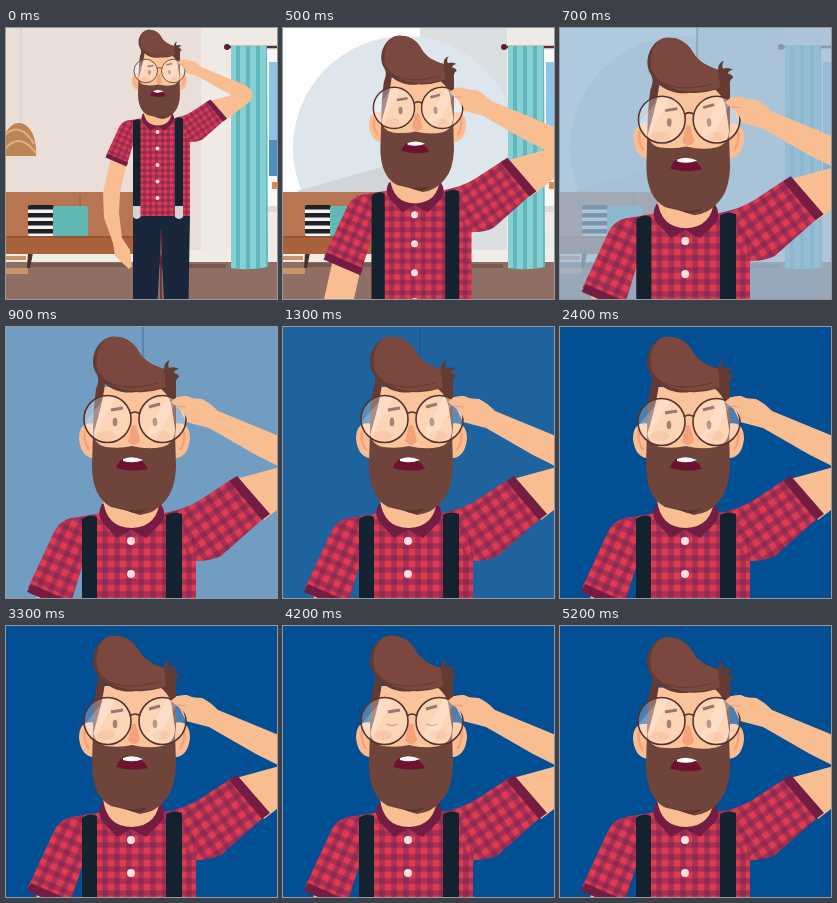
Animation, 271 px wide and 271 px high, one loop 5.3 s. Source, as an HTML page:

```html
<!DOCTYPE html>
<html lang="en">
<head>
<meta charset="utf-8">
<title>Puzzled man</title>
<style>
html, body { margin: 0; width: 100%; height: 100%; overflow: hidden; background: #034f93; }
svg { display: block; width: 100%; height: 100%; }
</style>
</head>
<body>
<svg viewBox="0 0 271 271">
  <defs>
    <pattern id="plaid" width="12" height="12" patternUnits="userSpaceOnUse">
      <rect width="12" height="12" fill="#de3a50"/>
      <path d="M0 3H12" stroke="#5c1f52" stroke-width="5.5" opacity=".4"/>
      <path d="M3 0V12" stroke="#5c1f52" stroke-width="5.5" opacity=".4"/>
    </pattern>
    <pattern id="plaidArm" href="#plaid" patternTransform="translate(190 180) rotate(-34)"/>
    <pattern id="plaidLeft" href="#plaid" patternTransform="translate(58 196) rotate(24)"/>
    <pattern id="folds" width="10" height="10" patternUnits="userSpaceOnUse">
      <rect width="10" height="10" fill="#84d0d2"/>
      <rect width="4" height="10" fill="#62b6bc"/>
    </pattern>
    <pattern id="stripes" width="8" height="8" y="177" patternUnits="userSpaceOnUse">
      <rect width="8" height="8" fill="#f4f1ee"/>
      <rect width="8" height="4.5" fill="#1e2027"/>
    </pattern>
    <clipPath id="lenses"><circle cx="101.5" cy="92" r="23.5"/><circle cx="156.5" cy="92" r="23.5"/></clipPath>
  </defs>

  <g id="room">
    <rect width="271" height="271" fill="#e9dfd8"/>
    <rect x="195" width="76" height="271" fill="#f0eae6"/>
    <path d="M15 0V94" stroke="#d5cbc4"/>
    <path d="M-4 128C-6 84 32 84 30 128Z" fill="#bd8455"/>
    <path d="M-2 108Q14 92 28 116M0 120Q14 104 30 125" fill="none" stroke="#deb083" stroke-width="2"/>
    <g id="wash" opacity="0">
      <path d="M0 0H137V222H0Z" fill="#fdfdfe"/>
      <path d="M137 0H224V222H137Z" fill="#dcdfe2"/>
      <circle cx="122" cy="120" r="112" fill="#dce6ec"/>
      <path d="M14 163L137 128V222H50Z" fill="#cfd5d8"/>
    </g>
    <rect y="222" width="271" height="13" fill="#f2ece8"/>
    <rect y="234" width="271" height="37" fill="#8f6f63"/>
    <path d="M22 237H122M150 238H220" stroke="#78594f" stroke-width="4"/>
    <path d="M0 240H22V246H0ZM0 228H20V232H0Z" fill="#c99468"/>
    <path d="M22 225H27L24 240H21ZM148 225H154L161 243H157Z" fill="#49302c"/>
    <rect x="-6" y="164" width="155" height="50" rx="4" fill="#b77551"/>
    <path d="M74 166V208" stroke="#955a3d"/>
    <rect x="-6" y="208" width="160" height="18" rx="4" fill="#a8623e"/>
    <path d="M0 209H150" stroke="#8b5036" stroke-width="1.5"/>
    <rect x="22" y="177" width="26" height="31" rx="2" fill="url(#stripes)"/>
    <rect x="47" y="178" width="35" height="30" rx="2" fill="#61b9b5"/>
    <rect x="260" y="22" width="11" height="162" fill="#faf8f6"/>
    <rect x="263" y="34" width="8" height="114" fill="#8fc4e4"/>
    <rect x="263" y="112" width="8" height="36" fill="#4e8fc0"/>
    <path d="M266 154H271V161H266Z" fill="#dd8748"/>
    <path d="M258 178H271V184H258Z" fill="#e2d9d3"/>
    <path d="M221 19H271" stroke="#5a3038" stroke-width="2.5"/>
    <circle cx="221" cy="19" r="3" fill="#5a2030"/>
    <path d="M225 18H261L262 239Q243 243 225 240Z" fill="url(#folds)"/>
  </g>

  <g id="blank" opacity="0">
    <rect width="271" height="271" fill="#fff"/>
    <path d="M137 0V60" stroke="#c3c9cf" stroke-width="2"/>
  </g>
  <rect id="blue" width="271" height="271" fill="#034f93" opacity="0"/>

  <g id="man">
    <path d="M76 376H190L187 556H138L132 420L125 556H76Z" fill="#1a273a"/>
    <path d="M132 410V556" stroke="#5d2638" stroke-width="3"/>
    <path d="M32 264L16 336L18 386L36 436L40 462L68 488L74 482L70 450L54 426L48 376L50 336L63 278Z" fill="#f9bd92"/>
    <path d="M168 70L196 72Q203 75 212 84L300 120Q324 134 310 153L258 193L230 152L274 140L250 128L203 101L180 95Z" fill="#f9bd92"/>
    <path d="M96 186L66 191Q54 193 48 205L60 274L76 236V382H190V234L210 230L150 180Z" fill="url(#plaid)"/>
    <path d="M76 190L66 191Q54 193 47 207L22 261L64 279L76 240Z" fill="url(#plaidLeft)"/>
    <path d="M158 186Q180 182 194 173L226 152L259 190L215 229Q205 234 190 234L176 215Z" fill="url(#plaidArm)"/>
    <path d="M25 257L66 275L63 283L21 265ZM223 154L231 149L264 187L256 193Z" fill="#741d43"/>
    <path d="M190 234L186 208" stroke="#7b1f49" opacity=".55"/>
    <path d="M76 192Q83 186 91 190V372H76ZM160 188Q168 184 176 187V372H160Z" fill="#14212e"/>
    <path d="M76 362H91V384Q83 392 76 384ZM160 362H176V384Q168 392 160 384Z" fill="#d4d4d6"/>
    <path d="M96 177Q90 187 97 196L111 211L125 203L140 211L156 195Q161 187 155 177Z" fill="#741d43"/>
    <path d="M97 172Q100 201 126 201Q152 200 154 172Z" fill="#f9bd92"/>
    <g id="buttons" fill="#f5dfe1"></g>

    <g id="head">
      <path d="M90 97Q73 93 73 112Q75 129 86 131H92ZM167 97Q184 93 184 112Q182 129 171 131H166Z" fill="#fabd92"/>
      <path d="M79 104Q77 114 83 123M178 104Q180 114 174 123" fill="none" stroke="#f3a37b" stroke-width="2.5"/>
      <path d="M92 60H168V135H88Z" fill="#fac39a"/>
      <path d="M87 104Q88 118 100 120Q114 122 126 119Q142 123 156 120Q168 117 169 104L170 140Q169 163 159 174Q150 186 134 188Q120 183 105 180Q86 170 86 138Z" fill="#6e443b"/>
      <path d="M104 177Q122 187 142 181Q134 190 122 184Z" fill="#5c3630"/>
      <path d="M87 108C87 92 88 76 90 62C93 55 93 51 90 46C83 34 89 14 104 10C120 8 129 17 133 25C138 34 148 39 158 42Q158 35 164 33Q161 37 163 41Q168 39 173 42Q168 43 168 46Q173 47 173 50Q169 52 170 58V108L166 82C165 72 160 66 155 62Q143 66 130 65C118 67 108 64 99 57C97 72 93 88 87 108Z" fill="#633b33"/>
      <path d="M92 44C88 32 92 14 104 10C120 8 129 17 133 25C138 34 148 39 158 42Q159 52 160 60Q154 62 143 63C123 66 104 62 92 44Z" fill="#7a483e"/>
      <path d="M99 54Q120 65 152 56" fill="none" stroke="#633b33" stroke-width="1.2"/>

      <g fill="#f3a57f" opacity=".55">
        <ellipse cx="100" cy="109" rx="9" ry="5"/><ellipse cx="155" cy="109" rx="9" ry="5"/>
      </g>
      <path d="M126 98L122 114Q128 122 134 114L130 98Z" fill="#f4a27a"/>
      <path d="M110 141Q113 131 123 130Q136 130 142 142Q126 146 110 141Z" fill="#6f1230"/>
      <path d="M117 132Q126 128 137 133Q128 137 117 134Z" fill="#fff"/>
    </g>

    <g id="specs">
      <path d="M105 83L117 81M143 80L154 77" stroke="#70443a" stroke-width="3"/>
      <g id="eyes" fill="#82523f">
        <ellipse cx="109" cy="95" rx="2.3" ry="4.3"/><ellipse cx="149" cy="95" rx="2.3" ry="4.3"/>
      </g>
      <path id="lids" d="M104 95Q109 98 114 95M144 95Q149 98 154 95" fill="none" stroke="#b57558" stroke-width="1.2"/>
      <g clip-path="url(#lenses)" fill="#fff">
        <path d="M76 66H182V118H76Z" opacity=".28"/>
        <path d="M76 98L103 66H112L84 118ZM138 111L163 66H175L148 118Z" opacity=".2"/>
      </g>
      <g fill="none" stroke="#57312f" stroke-width="1.6">
        <circle cx="101.5" cy="92" r="23.5"/><circle cx="156.5" cy="92" r="23.5"/>
        <path d="M124 87Q129 83 134 87"/>
      </g>
    </g>
    <path d="M165 75Q170 68 181 69L198 76L196 94L181 92Q178 84 171 80Z" fill="#f9bd92"/>
    <path d="M180 80L171 79" stroke="#e99b75"/>
  </g>
</svg>
<script>
const LOOP = 5300, STEP = 100;
const $ = id => document.getElementById(id);
const ramp = (t, from, to) => Math.min(1, Math.max(0, (t - from) / (to - from)));
const smooth = u => u * u * (3 - 2 * u);
const easeOut = u => 1 - (1 - u) ** 2;
const shiftY = (id, y) => $(id).setAttribute('transform', `translate(0 ${y})`);
const fade = (id, alpha) => $(id).setAttribute('opacity', alpha);

for (let y = 214; y < 370; y += 33) {
  $('buttons').insertAdjacentHTML('beforeend', `<circle cx="125" cy="${y}" r="4"/>`);
}

function draw(t) {
  const zoom = smooth(ramp(t, 0, 740)), away = 1 - zoom;
  $('man').setAttribute('transform',
    `translate(${89 * away} ${-3 * away}) scale(${0.5 + 0.5 * zoom})`);
  fade('wash', ramp(t, 0, 500));
  fade('blank', ramp(t, 500, 800));
  fade('blue', easeOut(ramp(t, 500, 1700)));

  // The glasses slip down, then the head dips.
  shiftY('specs', 3 * smooth(ramp(t, 1300, 2300)));
  shiftY('head', 1.5 * smooth(ramp(t, 4300, 4800)));

  const open = 1 - ramp(t, 4000, 4200) + ramp(t, 4200, 4400);
  $('eyes').setAttribute('transform', `translate(0 ${95 * (1 - open)}) scale(1 ${open})`);
  fade('lids', open < 0.3 ? 1 : 0);
}

const start = performance.now();
function tick() {
  const t = (performance.now() - start) % LOOP;
  draw(Math.floor(t / STEP) * STEP);
  requestAnimationFrame(tick);
}
draw(0);
requestAnimationFrame(tick);
</script>
</body>
</html>
```
